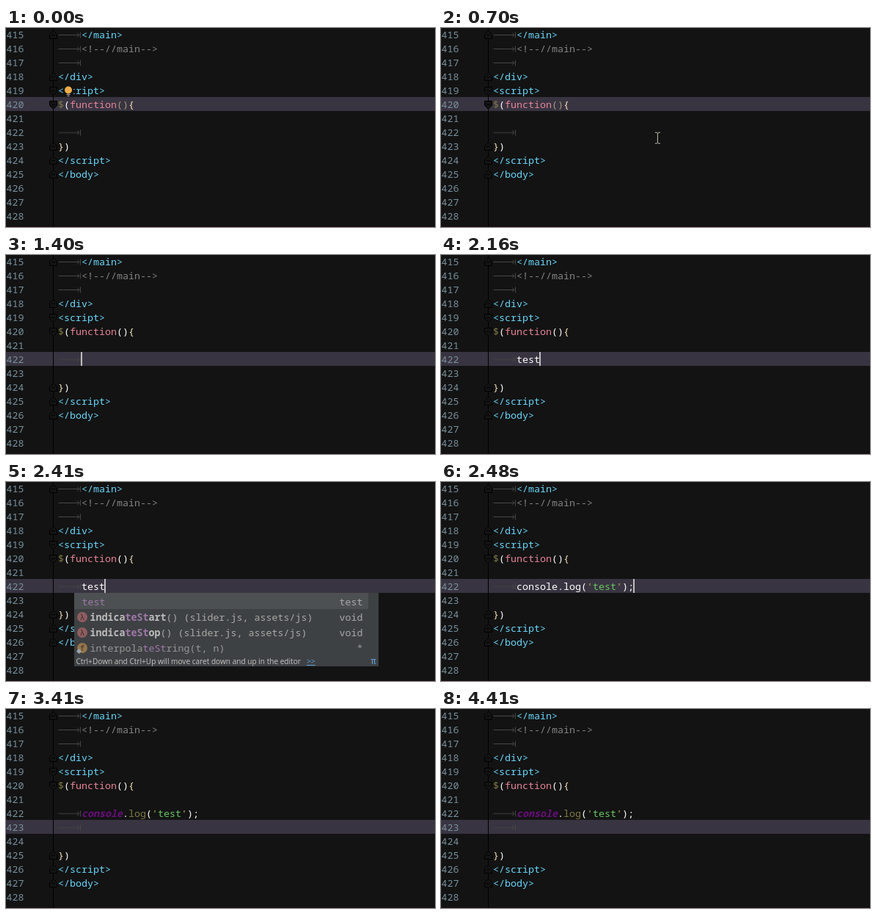
Animation of 585x271 px, one loop 4730 ms. Source, as an HTML page:

```html
<!DOCTYPE html>
<html lang="en">
<head>
<meta charset="utf-8">
<title>Console log shortcut</title>
<style>
html, body { margin: 0; height: 100%; overflow: hidden; background: #131313; }
svg { display: block; width: 585px; height: 271px; }
text { font: 500 13.3333px "Noto Sans Mono", "DejaVu Sans Mono", monospace; white-space: pre; fill: #fff; }

.num { fill: #78909c; }
.tag { fill: #6ad8fc; }
.note { fill: #848484; }
.call { fill: #7f7a43; }
.key { fill: #e88599; }
.brace { fill: #f8e4bc; }
.quote { fill: #b9b45e; }
.str { fill: #68c860; }
.obj { fill: #6a0e7e; font-weight: bold; font-style: italic; }
.match { fill: #a59a7c; }
.tab { fill: none; stroke: #474747; }
.fold { fill: #131313; stroke: #000; }

.popup text { fill: #a8a8a8; }
.popup .dim { fill: #969696; }
.popup .hit { fill: #a078aa; }
.popup .bold { fill: #bcbcbc; font-weight: bold; }
.popup .hint { font: 10.1px "Open Sans", "Noto Sans", sans-serif; fill: #c4c4c4; }
.popup .link { fill: #5f9fdc; }
.popup .glyph { font-size: 10px; text-anchor: middle; fill: #3b2a2c; }

/* one 4730 ms clock; every change is a hard step unless noted */
.anim { animation: 4730ms step-end infinite; }
.bulb { animation-name: bulb; }
.before { animation-name: before; }
.after { animation-name: after; }
.band { animation-name: band; }
.tail { animation-name: tail; }
.indent { animation-name: indent; }
.typed { animation-name: typed; }
.popup { animation-name: popup; }
.plain { animation-name: plain; }
.colored { animation-name: colored; }
.next { animation-name: next; }
.caret { animation-name: caret; }
.mouse { animation-name: mouse; }

@keyframes bulb { 0% { opacity: 1 } 3.17%, 100% { opacity: 0 } }
@keyframes before { 0% { opacity: 1 } 18.18%, 100% { opacity: 0 } }
@keyframes after { 0% { opacity: 0 } 18.18%, 100% { opacity: 1 } }
@keyframes band {
  0% { transform: none }
  18.18% { transform: translateY(19px) }
  29.59% { transform: translateY(38px) }
  54.12%, 100% { transform: translateY(57px) }
}
@keyframes tail {
  0% { transform: none }
  29.59% { transform: translateY(19px) }
  54.12%, 100% { transform: translateY(38px) }
}
@keyframes indent { 0% { opacity: 0 } 29.59%, 100% { opacity: 1 } }
@keyframes typed {
  0% { clip-path: inset(0 100% 0 0); opacity: 1 }
  39.53% { clip-path: inset(0 75% 0 0) }
  41.58% { clip-path: inset(0 50% 0 0) }
  43.62% { clip-path: inset(0 25% 0 0) }
  45.66% { clip-path: inset(0 0 0 0); opacity: 1 }
  52.43%, 100% { clip-path: inset(0 0 0 0); opacity: 0 }
}
@keyframes popup { 0% { opacity: 0 } 50.95% { opacity: 1 } 52.43%, 100% { opacity: 0 } }
@keyframes plain { 0% { opacity: 0 } 52.43% { opacity: 1 } 60.88%, 100% { opacity: 0 } }
@keyframes colored { 0% { opacity: 0 } 60.88%, 100% { opacity: 1 } }
@keyframes next { 0% { opacity: 0 } 54.12%, 100% { opacity: 1 } }
@keyframes caret {
  0% { opacity: 0; transform: none }
  18.18% { opacity: 1; transform: translate(0, 19px) }
  29.59% { transform: translate(32px, 38px) }
  39.53% { transform: translate(40px, 38px) }
  41.58% { transform: translate(48px, 38px) }
  43.62% { transform: translate(56px, 38px) }
  45.66% { transform: translate(64px, 38px) }
  52.43% { transform: translate(192px, 38px) }
  54.12% { opacity: 1; transform: translate(32px, 57px) }
  72.09% { opacity: 0 }
  82.66% { opacity: 1 }
  93.23%, 100% { opacity: 0; transform: translate(32px, 57px) }
}
/* the pointer glides in small jumps */
@keyframes mouse {
  0% { opacity: 0; transform: translate(462px, 244px) }
  3.17% { opacity: 1; transform: translate(462px, 244px) }
  5.07% { opacity: 1; transform: translate(400px, 188px) }
  8.24% { opacity: 1; transform: translate(400px, 188px); animation-timing-function: steps(7, start) }
  19.86% { opacity: 1; transform: translate(216px, 121px) }
  19.87% { opacity: 1; transform: translate(218px, 122px) }
  29.59% { opacity: 0; transform: translate(218px, 122px) }
  76.95% { opacity: 1; transform: translate(222px, 122px); animation-timing-function: steps(6, end) }
  86.88% { opacity: 1; transform: translate(526px, 247px) }
  86.89%, 100% { opacity: 0; transform: translate(526px, 247px) }
}
</style>
</head>
<body>
<svg viewBox="0 0 585 271" xmlns="http://www.w3.org/2000/svg">
  <defs>
    <path id="open" class="fold" d="M-5-5H5V1L0 6L-5 1ZM-2.5 0H2.5"/>
    <path id="close" class="fold" d="M-5 5H5V-1L0-6L-5-1ZM-2.5 0H2.5"/>
    <path id="tab" class="tab" d="M71.5 0H100M97-3L100 0L97 3M101.5-4V4"/>
  </defs>

  <rect width="585" height="271" fill="#131313"/>
  <rect y="270" width="585" height="1" fill="#1e0e10"/>
  <rect class="anim band" y="94" width="585" height="19" fill="#393441"/>
  <rect x="64" width="1" height="271" fill="#000"/>
  <g id="numbers"></g>

  <use href="#close" x="64.5" y="9.5"/>
  <use href="#close" x="64.5" y="66.5"/>
  <use href="#open" x="64.5" y="85.5"/>
  <use href="#open" x="64.5" y="104.5"/>
  <use href="#tab" y="9.5"/>
  <use href="#tab" y="28.5"/>
  <use href="#tab" y="47.5"/>

  <text class="tag" x="103" y="14">&lt;/main&gt;</text>
  <text class="note" x="103" y="33">&lt;!--//main--&gt;</text>
  <text class="tag" x="71" y="71">&lt;/div&gt;</text>
  <text class="tag" x="71" y="90">&lt;script&gt;</text>
  <text x="71" y="109"><tspan class="call">$</tspan>(<tspan class="key">function</tspan></text>
  <text class="brace" x="167" y="109">{</text>
  <text class="anim before match" x="151" y="109">()</text>
  <text class="anim after" x="151" y="109">()</text>

  <g class="anim bulb">
    <rect x="78" y="79" width="14" height="14" fill="#131313"/>
    <circle cx="85" cy="84.5" r="5" fill="#f0ad4a"/>
    <path d="M82.5 90.5H87.5M83.5 92.5H86.5" stroke="#b4b4b4"/>
  </g>

  <use class="anim before" href="#tab" y="142.5"/>
  <use class="anim indent" href="#tab" y="142.5"/>
  <use class="anim next" href="#tab" y="161.5"/>

  <text class="anim typed" x="103" y="147">test</text>
  <text class="anim plain" x="103" y="147">console.log(<tspan class="quote">'<tspan class="str">test</tspan>'</tspan>);</text>
  <text class="anim colored" x="103" y="147"><tspan class="obj">console</tspan>.<tspan class="call">log</tspan>(<tspan class="quote">'<tspan class="str">test</tspan>'</tspan>);</text>

  <g class="anim tail">
    <use href="#close" x="64.5" y="161.5"/>
    <use href="#close" x="64.5" y="180.5"/>
    <use href="#close" x="64.5" y="199.5"/>
    <text x="71" y="166"><tspan class="brace">}</tspan>)</text>
    <text class="tag" x="71" y="185">&lt;/script&gt;</text>
    <text class="tag" x="71" y="204">&lt;/body&gt;</text>
  </g>

  <rect class="anim caret" x="70" y="94" width="2" height="19" fill="#bebebe"/>

  <g class="anim popup">
    <rect x="93" y="151" width="415" height="100" fill="#3e4143"/>
    <rect x="93" y="151" width="401" height="22" fill="#4c5052"/>
    <text class="hit" x="103.5" y="168">test</text>
    <text x="454.5" y="168">test</text>

    <circle cx="104" cy="184" r="7" fill="#8f5d60"/>
    <text class="glyph" x="104" y="187.5">λ</text>
    <text x="114.5" y="189"><tspan class="bold">indica<tspan class="hit">teSt</tspan>art</tspan>() (slider.js, assets/js)</text>
    <text x="454.5" y="189">void</text>

    <circle cx="104" cy="205" r="7" fill="#8f5d60"/>
    <text class="glyph" x="104" y="208.5">λ</text>
    <text x="114.5" y="210"><tspan class="bold">indica<tspan class="hit">teSt</tspan>op</tspan>() (slider.js, assets/js)</text>
    <text x="454.5" y="210">void</text>

    <circle cx="104" cy="226" r="7" fill="#93764a"/>
    <text class="glyph" x="104" y="229.5">f</text>
    <path d="M99.5 227L103 230.5L99.5 234L96 230.5Z" fill="#9aa7b0"/>
    <text class="dim" x="114.5" y="231">interpola<tspan class="hit">teSt</tspan>ring(t, n)</text>
    <text class="dim" x="478.5" y="231">*</text>

    <text class="hint" x="95.5" y="248">Ctrl+Down and Ctrl+Up will move caret down and up in the editor</text>
    <text class="hint link" x="410" y="248" text-decoration="underline">&gt;&gt;</text>
    <text class="link" x="497" y="248">π</text>
  </g>

  <g class="anim mouse" fill="none">
    <path d="M-3-7.5H-1L.5-6.5L2-7.5H4M.5-6.5V6.5M-3 7.5H-1L.5 6.5L2 7.5H4" stroke="#111" stroke-width="3"/>
    <path d="M-3-7.5H-1L.5-6.5L2-7.5H4M.5-6.5V6.5M-3 7.5H-1L.5 6.5L2 7.5H4" stroke="#c8c6b8"/>
  </g>
</svg>
<script>
const numbers = document.getElementById('numbers');
for (let row = 0; row < 14; row++) {
  const label = document.createElementNS('http://www.w3.org/2000/svg', 'text');
  label.setAttribute('class', 'num');
  label.setAttribute('x', 0.5);
  label.setAttribute('y', 14 + 19 * row);
  label.textContent = 415 + row;
  numbers.append(label);
}
</script>
</body>
</html>
```
